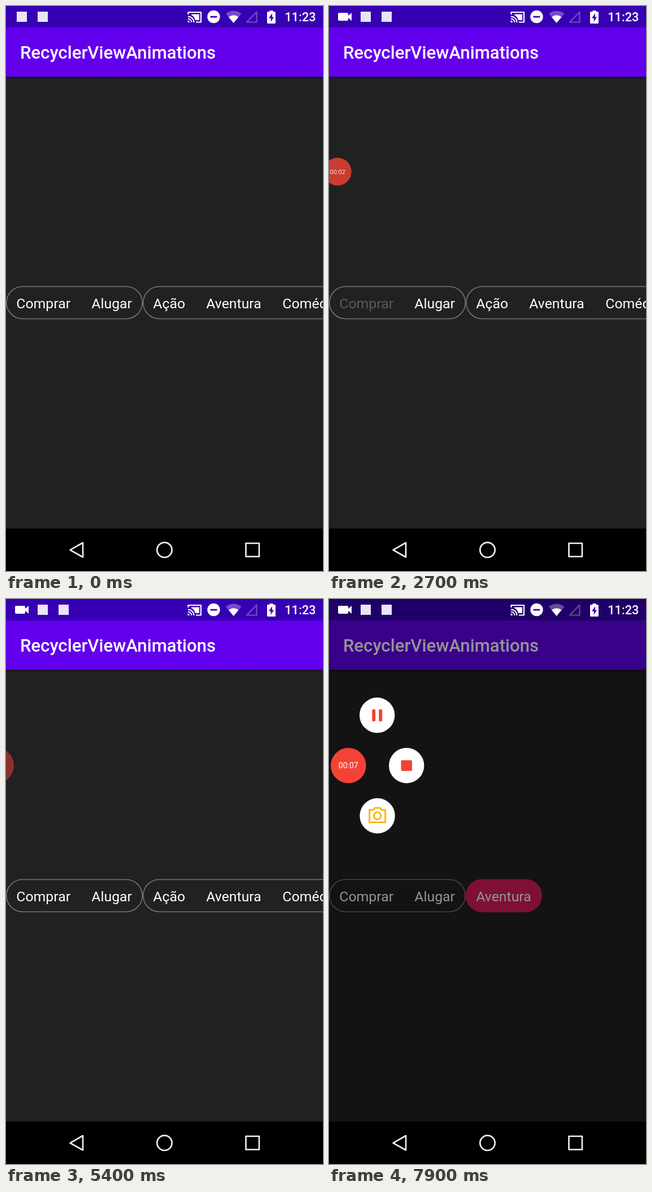
Animation, 561 px wide and 998 px high, one loop 8200 ms. Source, as an HTML page with a canvas:

```html
<!DOCTYPE html>
<html lang="pt">
<head>
<meta charset="utf-8">
<style>
html, body { margin: 0; width: 100%; height: 100%; overflow: hidden; background: #212121; }
canvas { display: block; }
</style>
</head>
<body>
<canvas id="stage" width="561" height="998"></canvas>
<script>
const c = document.getElementById('stage').getContext('2d');
const LOOP = 8200, PINK = '#d81b60', RED = '#f44336', GREY = '#807174';
const FONT = 'Roboto, sans-serif';
const FADE = 120, MOVE = 250;

const clamp = v => Math.max(0, Math.min(1, v));
const mix = (a, b, p) => a + (b - a) * p;
const span = (t, start, length) => clamp((t - start) / length);
const ease = p => (1 - Math.cos(Math.PI * p)) / 2;

function rect(x, y, w, h, color) {
  c.fillStyle = color;
  c.fillRect(x, y, w, h);
}

function round(x, y, w, h, r, color) {
  c.beginPath();
  c.roundRect(x, y, w, h, r);
  c.fillStyle = color;
  c.fill();
}

function disc(x, y, r, color) {
  c.beginPath();
  c.arc(x, y, r, 0, 7);
  c.fillStyle = color;
  c.fill();
}

function ring(x, y, r, color, width) {
  c.beginPath();
  c.arc(x, y, r, 0, 7);
  c.strokeStyle = color;
  c.lineWidth = width;
  c.stroke();
}

function text(s, x, y, size, weight = 400, align = 'left') {
  c.font = `${weight} ${size}px ${FONT}`;
  c.textAlign = align;
  c.fillStyle = '#fff';
  c.fillText(s, x, y);
}

function path(d, color, width) {
  const p = new Path2D(d);
  c.fillStyle = c.strokeStyle = color;
  c.lineWidth = width || 0;
  width ? c.stroke(p) : c.fill(p);
}

// Filter groups: item labels and widths; each pick keeps one item from "on" to "off".
const types = {
  items: [['Comprar', 133], ['Alugar', 109]],
  picks: [{ item: 1, on: 1060, off: 2410 }, { item: 0, on: 3560, off: 4600 }]
};
const genres = {
  items: [['Ação', 94], ['Aventura', 135], ['Comédia', 136], ['Terror', 112]],
  picks: [{ item: 1, on: 5610, off: 1e9 }]
};

// Returns the right edge, so that the next group can follow.
function drawGroup({ items, picks }, left, t) {
  const pick = picks.find(p => t >= p.on && t < p.off + MOVE + FADE);
  const chosen = pick && t < pick.off;
  const moved = time => chosen
    ? ease(span(time, pick.on + FADE, MOVE))
    : 1 - ease(span(time, pick.off, MOVE));
  const othersAlpha = !pick ? 1 : chosen
    ? 1 - ease(span(t, pick.on, FADE))
    : ease(span(t, pick.off + MOVE, FADE));
  const full = items.reduce((sum, item) => sum + item[1], 0);
  const width = pick ? mix(full, items[pick.item][1], moved(t)) : full;

  c.save();
  c.beginPath();
  c.roundRect(left, 494.7, width, 58.6, 29.3);
  c.clip();
  let x = 0;
  items.forEach(([label, w], i) => {
    const kept = pick && pick.item === i;
    const itemX = left + (kept ? x * (1 - moved(t - 20)) : x);
    c.globalAlpha = kept ? 1 : othersAlpha;
    if (kept && chosen) round(itemX, 494.7, w, 58.6, 29.3, PINK);
    text(label, itemX + 18.3, 534, 24.8);
    x += w;
  });
  c.restore();

  c.beginPath();
  c.roundRect(left + .8, 495.5, width - 1.6, 57, 28.5);
  c.strokeStyle = chosen ? PINK : GREY;
  c.lineWidth = 1.6;
  c.stroke();
  return left + width;
}

function drawApp(t) {
  rect(0, 0, 561, 998, '#212121');
  const shadow = c.createLinearGradient(0, 125, 0, 131);
  shadow.addColorStop(0, 'rgba(0,0,0,.35)');
  shadow.addColorStop(1, 'rgba(0,0,0,0)');
  rect(0, 125, 561, 6, shadow);
  rect(0, 0, 561, 38, '#3700b3');
  rect(0, 38, 561, 87, '#6200ee');
  text('RecyclerViewAnimations', 24.9, 93, 31.16, 500);
  drawGroup(genres, drawGroup(types, 0, t), t);
}

function drawStatus(t) {
  const faint = 'rgba(255,255,255,.3)';
  const recording = t >= 200;
  if (recording) {
    round(16, 12, 18, 14, 2, '#fff');
    path('M33 18L40 12V26L33 20Z', '#fff');
  }
  for (let i = 0; i < 2; i++) rect((recording ? 56 : 19) + i * 37, 10, 18, 18, '#e9e5f6');

  path('M322.5 15V11H345V28.5H336', '#fff', 2.2);
  path('M322 18.5A10.5 10.5 0 0 1 332.5 29M322 22.5A6.5 6.5 0 0 1 328.5 29', '#fff', 2);
  path('M321.5 25.5A3.5 3.5 0 0 1 325 29H321.5Z', '#fff');
  path('M328 14.5H342V25H335Q333 18 328 16Z', '#fff');
  disc(367.5, 19, 11.2, '#fff');
  rect(361.5, 17.7, 12, 2.8, '#3700b3');
  path('M389 13.5Q402.5 3.5 416.5 13.5L402.7 30Z', faint);
  path('M394 19.5Q402.7 13 411.5 19.5L402.7 30Z', '#fff');
  path('M426 28.5H443.5V10.5Z', faint, 2.2);
  round(462, 10, 15, 21, 1.5, '#fff');
  rect(466.5, 8, 6, 3, '#fff');
  path('M471 13L465 21.5H468.7V28L474 19.5H471Z', '#3700b3');
  text('11:23', 548.5, 27, 21.8, 500, 'right');
}

function drawNav() {
  rect(0, 923, 561, 75, '#000');
  c.lineJoin = 'round';
  path('M113.5 960.8L136 948V973.5Z', '#f2f2f2', 2.6);
  ring(280.5, 960.8, 13.2, '#f2f2f2', 2.7);
  path('M424.5 949H448V972.5H424.5Z', '#f2f2f2', 2.6);
}

// Recorder button, docked to the edge while idle.
function bubble(t) {
  const home = [34.3, 294.2, 31.2, 1], docked = [12, 292.3, 23.4, .77], hidden = [-17.5, 294, 31.5, .5];
  const blend = (a, b, p) => a.map((v, i) => mix(v, b[i], p));
  if (t >= 7400) return home;
  if (t >= 5000) return blend(docked, hidden, ease(span(t, 5000, 300)));
  return blend(home, docked, ease(span(t, 2400, 400)));
}

function drawMenu(open) {
  const button = (x, y, icon) => {
    c.save();
    c.translate(mix(34.3, x, open), mix(294.2, y, open));
    c.scale(open, open);
    disc(0, 0, 31.2, '#fff');
    icon();
    c.restore();
  };
  button(85.2, 205.3, () => {
    round(-9, -10.5, 6, 21.5, 2.5, RED);
    round(3, -10.5, 6, 21.5, 2.5, RED);
  });
  button(137.2, 294.2, () => round(-9.7, -9.5, 19.5, 19, 2.5, RED));
  button(85.6, 383, () => {
    path('M-14 -10.5H-7.5L-4.5 -14H4.5L7.5 -10.5H14V11.5H-14Z', '#fbb90e', 3);
    ring(0, 0, 6.3, '#fbb90e', 3);
  });
}

function drawBubble(t) {
  if (t < 200) return;
  const [x, y, r, alpha] = bubble(t);
  const seconds = t >= 7500 ? 7 : [900, 2300, 3300, 4300].filter(s => t >= s).length;
  c.save();
  c.globalAlpha = alpha;
  c.translate(x, y);
  c.scale(r / 31.2, r / 31.2);
  disc(0, 0, 31.2, RED);
  if (t < 7400 || t >= 7500) text('00:0' + seconds, 0, 5, 14, 400, 'center');
  c.restore();
}

// start, end, x, y
const touches = [
  [900, 1060, 190, 532], [2290, 2450, 55, 534], [3400, 3570, 55, 533],
  [4400, 4610, 48, 534], [5480, 5640, 405, 532], [7340, 7470, 25, 280]
];

function drawTouches(t) {
  for (const [start, end, x, y] of touches) {
    if (t < start || t >= end) continue;
    const glow = c.createRadialGradient(x, y, 0, x, y, 23);
    [[0, .56], [.5, .6], [.7, .66], [.75, .3], [1, 0]].forEach(([stop, alpha]) =>
      glow.addColorStop(stop, `rgba(255,255,255,${alpha})`));
    disc(x, y, 23, glow);
  }
}

function draw() {
  const t = performance.now() % LOOP;
  const open = ease(span(t, 7500, 350));
  drawApp(t);
  rect(0, 0, 561, 923, `rgba(0,0,0,${.42 * open})`);
  drawStatus(t);
  drawNav();
  if (open) drawMenu(open);
  drawBubble(t);
  drawTouches(t);
  requestAnimationFrame(draw);
}
draw();
</script>
</body>
</html>
```
